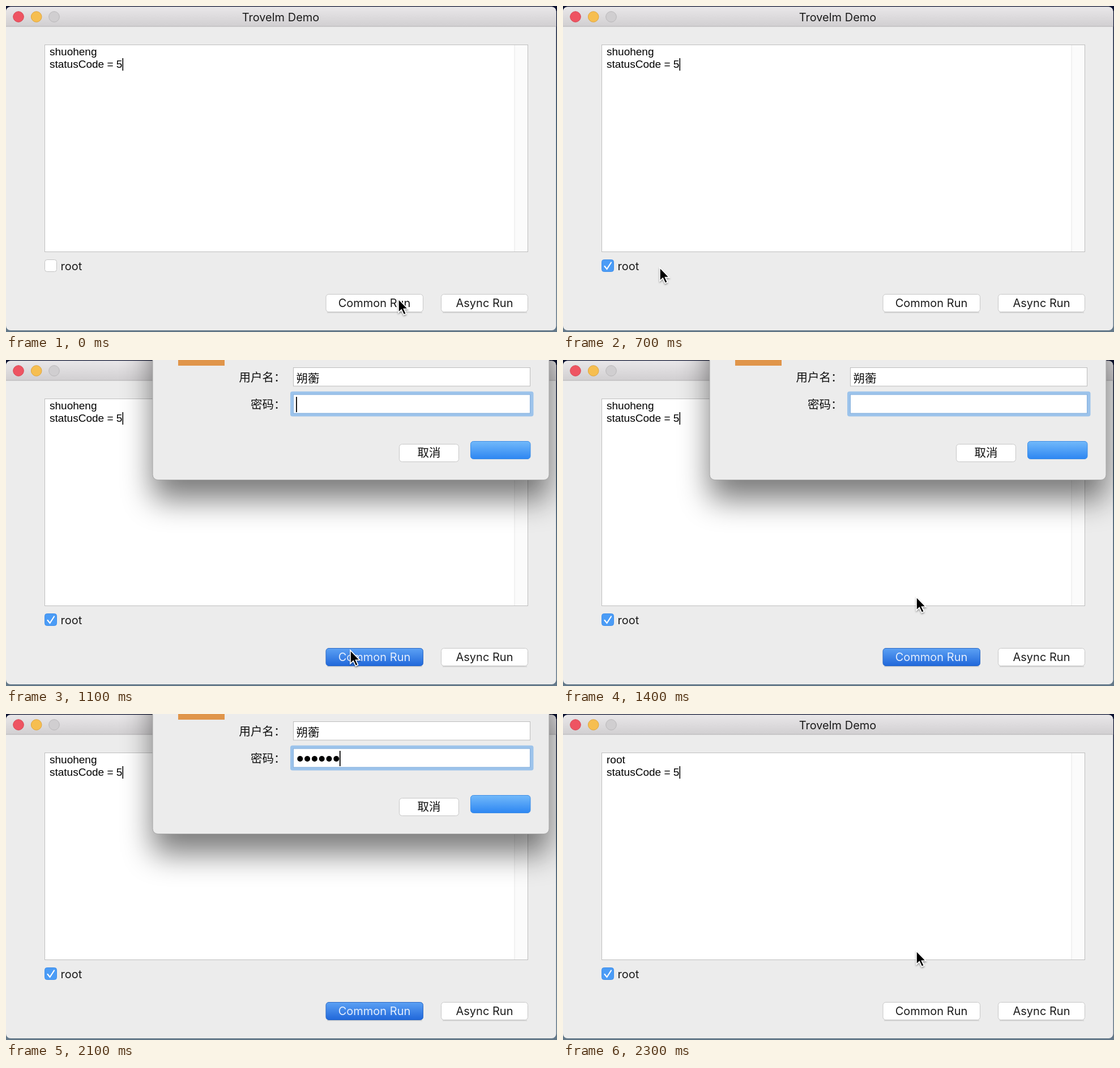
Recreate the animation shown at these times as an HTML page. Size 973x575 px, loop 2.4 s.

```html
<!DOCTYPE html>
<html lang="zh-CN">
<head>
<meta charset="utf-8">
<style>
  html, body { margin: 0; width: 100%; height: 100%; overflow: hidden; }
  svg { display: block; }
  text { font: 20px Inter, sans-serif; fill: #1c1c1c; }
  .mid { text-anchor: middle; }
  .log text { font: 19px "Liberation Sans", Arial, sans-serif; fill: #000; }
  #dialog text { font: 20.5px "Noto Sans CJK SC", "Noto Sans CJK", sans-serif; fill: #111; }
  .button { fill: #fff; stroke: #c6c6c6; }
  .field { fill: #fff; stroke: #bcbcbc; }
</style>
</head>
<body>
<svg width="973" height="575" viewBox="0 0 973 575">
  <defs>
    <linearGradient id="desk" x2="0" y2="1">
      <stop stop-color="#0c1230"/><stop offset=".35" stop-color="#1d3a55"/>
      <stop offset="1" stop-color="#64798a"/>
    </linearGradient>
    <linearGradient id="bar" x2="0" y2="1">
      <stop stop-color="#e9e7e9"/><stop offset="1" stop-color="#d1cfd1"/>
    </linearGradient>
    <linearGradient id="pressed" x2="0" y2="1">
      <stop stop-color="#5ca1f4"/><stop offset="1" stop-color="#2067da"/>
    </linearGradient>
    <linearGradient id="default" x2="0" y2="1">
      <stop stop-color="#72b9fa"/><stop offset="1" stop-color="#2d86f2"/>
    </linearGradient>
    <filter id="blur" x="-30%" y="-60%" width="160%" height="220%"><feGaussianBlur stdDeviation="27"/></filter>
    <filter id="soft" x="-50%" y="-50%" width="200%" height="200%">
      <feDropShadow dx="0" dy="2" stdDeviation="1.5" flood-opacity=".4"/>
    </filter>
  </defs>

  <rect width="973" height="575" fill="url(#desk)"/>
  <rect y="1.5" width="971.5" height="570.5" rx="8" fill="#ececec"/>
  <path d="M0 36V9.500a8 8 0 0 1 8-8H963.500a8 8 0 0 1 8 8V36z" fill="url(#bar)"/>
  <path d="M0 36H971.500" stroke="#b4b2b4"/>
  <circle cx="22" cy="19" r="9.300" fill="#ee5462" stroke="#d84653"/>
  <circle cx="53.700" cy="19" r="9.300" fill="#f6be50" stroke="#dfa53e"/>
  <circle cx="85" cy="19" r="9.300" fill="#d0ced0" stroke="#b9b7b9"/>
  <text class="mid" x="485" y="27">Trovelm Demo</text>

  <g class="log">
    <rect x="68.500" y="68.500" width="853" height="365" fill="#fff" stroke="#bebebe"/>
    <rect x="898" y="69" width="23" height="364" fill="#fbfbfb"/>
    <path d="M898 69V433" stroke="#e6e6e6"/>
    <text id="user" x="77" y="87"></text>
    <text x="77" y="109">statusCode = 5</text>
    <path d="M206.300 92V114" stroke="#000" stroke-width="1.600"/>
  </g>

  <rect id="box" x="68.500" y="447.500" width="21" height="21" rx="4"/>
  <path id="tick" d="M73.500 459L77.500 464L85 452.500" fill="none" stroke="#fff" stroke-width="2.200" stroke-linecap="round"/>
  <text x="96.500" y="466">root</text>

  <rect y="540" x="567" width="168" height="1.500" fill="#d2d2d2"/>
  <rect y="540" x="771" width="149" height="1.500" fill="#d2d2d2"/>
  <rect id="run" class="button" x="565" y="508.500" width="171.500" height="31" rx="5"/>
  <text id="runLabel" class="mid" x="650.500" y="531">Common Run</text>
  <rect class="button" x="768.500" y="508.500" width="153" height="31" rx="5"/>
  <text class="mid" x="845" y="531">Async Run</text>

  <g id="dialog">
    <rect x="259" y="-116" width="700" height="362" rx="9" opacity=".52" filter="url(#blur)"/>
    <rect x="259" y="-150" width="700" height="361.500" rx="9" fill="#ececec" stroke="#a5a5a5"/>
    <rect x="304" y="-72" width="82" height="82" fill="#e0954a"/>
    <text x="411.500" y="38">用户名：</text>
    <text x="432" y="85.500">密码：</text>
    <rect class="field" x="507.500" y="13.500" width="418" height="32.500"/>
    <text x="512.500" y="39.500">朔蘅</text>
    <rect x="502" y="55.500" width="429.500" height="44" rx="4" fill="#9cc3eb"/>
    <rect x="507.500" y="61" width="418" height="33" fill="#fff" stroke="#82addb"/>
    <g id="dots"></g>
    <path id="caret" d="M513 65V92" stroke="#000" stroke-width="1.800"/>
    <rect class="button" x="694.500" y="148.500" width="105" height="31" rx="5"/>
    <text class="mid" x="747" y="171">取消</text>
    <rect x="820.500" y="143.500" width="105.500" height="31" rx="5" fill="url(#default)" stroke="#3d8de6"/>
  </g>

  <circle id="ring" r="34" fill="none" stroke="#000" stroke-width="2.400"/>
  <path id="cursor" d="M0 0V23.500L5.300 18.600L9.500 27.500L13.500 25.700L9.500 17.200H16.700Z"
    stroke="#fff" stroke-width="1.600" filter="url(#soft)"/>
</svg>
<script>
const LOOP = 2400, STEP = 100, PITCH = 12.8;
const $ = id => document.getElementById(id);
const show = (id, on) => $(id).setAttribute('visibility', on ? 'visible' : 'hidden');
const set = (id, attrs) => { for (const k in attrs) $(id).setAttribute(k, attrs[k]); };

// Pointer stops: time, x, y
const stops = [[0, 693, 517], [400, 90, 452], [600, 90, 452], [1000, 608, 512],
  [1200, 608, 512], [1400, 624, 418], [LOOP, 624, 418]];

function pointer(t) {
  const i = stops.findIndex(s => s[0] > t);
  const [t0, x0, y0] = stops[i - 1], [t1, x1, y1] = stops[i];
  const p = (t - t0) / (t1 - t0), e = p * p * (3 - 2 * p);
  return [x0 + (x1 - x0) * e, y0 + (y1 - y0) * e];
}

function draw(now) {
  const t = Math.floor(now % LOOP / STEP) * STEP;
  const [x, y] = pointer(t);
  const checked = t >= 600, pressed = t >= 1000 && t < 2300;
  const dialog = t >= 1100 && t < 2200;
  const typed = Math.max(0, Math.min(6, (t - 1500) / STEP));

  $('user').textContent = t < 2300 ? 'shuoheng' : 'root';
  set('box', { fill: checked ? '#4b9cf6' : '#fff', stroke: checked ? '#3f8fea' : '#c2c2c2' });
  show('tick', checked);
  set('run', { style: pressed ? 'fill:url(#pressed);stroke:#2b68c4' : '' });
  set('runLabel', { style: pressed ? 'fill:#e4eefd' : '' });

  $('dialog').style.display = dialog ? '' : 'none';
  $('dots').innerHTML = Array.from({ length: typed }, (_, i) =>
    `<circle cx="${519.3 + i * PITCH}" cy="79" r="5"/>`).join('');
  set('caret', { transform: `translate(${typed * PITCH} 0)` });
  show('caret', t < 1400 || typed > 0);

  set('ring', { cx: x, cy: y + 3 });
  show('ring', t === 500 || t === 1000);
  set('cursor', { transform: `translate(${x} ${y})` });
  show('cursor', t < 1600 || t >= 2300);
}

const start = performance.now();
function tick() {
  draw(performance.now() - start);
  requestAnimationFrame(tick);
}
tick();
</script>
</body>
</html>
```
